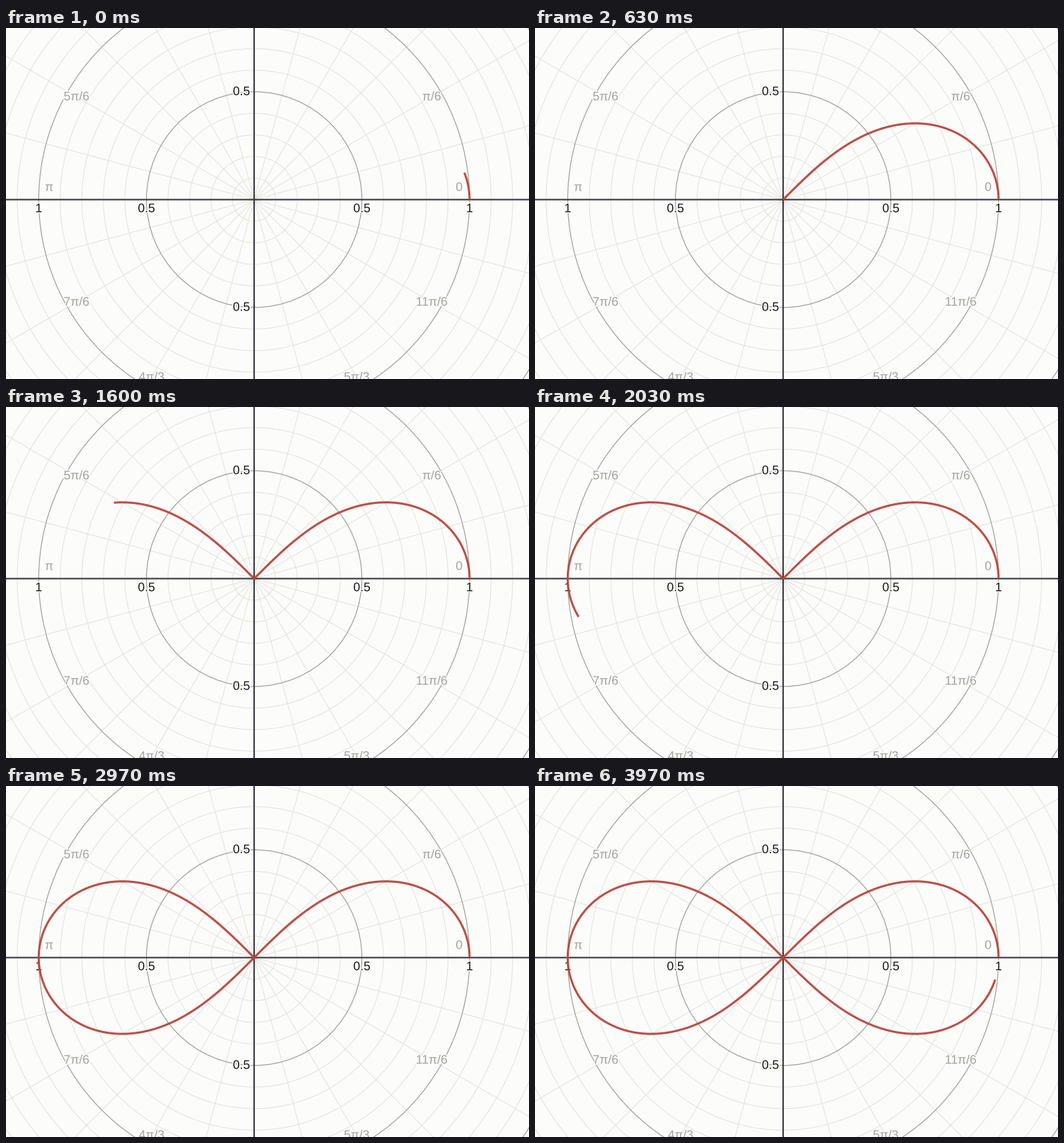
These frames come from a looping animation (740x496 px, 4010 ms). A matplotlib script:

```python
import numpy as np
import matplotlib.pyplot as plt
from matplotlib.animation import FuncAnimation
from matplotlib.patches import Circle
from matplotlib.patheffects import withStroke

W, H, DPI = 740, 496, 100
LOOP_MS, FRAMES = 4010, 120
CX, CY, UNIT = 351.1, 242.5, 304.8
PT = 72 / DPI  # points per pixel

PAPER = "#fcfcfb"
GRID = "#e2e2de"
MAJOR = "#a0a099"
AXIS = "#35313a"
ANGLE = "#a3a39c"
NUMBER = "#161616"
CURVE = "#b8463e"

plt.rcParams["font.family"] = "Liberation Sans"

fig = plt.figure(figsize=(W / DPI, H / DPI), dpi=DPI, facecolor=PAPER)
ax = fig.add_axes([0, 0, 1, 1])
ax.set_xlim(0, W)
ax.set_ylim(H, 0)
ax.axis("off")


def to_px(r, theta):
    return CX + UNIT * r * np.cos(theta), CY - UNIT * r * np.sin(theta)


def label(x, y, text, color):
    ax.text(x, y + 4.8, text, color=color, fontsize=17.5 * PT, ha="center",
            va="baseline", zorder=4,
            path_effects=[withStroke(linewidth=3 * PT, foreground=PAPER)])


def line(xs, ys, color, width, zorder):
    ax.plot(xs, ys, color=color, lw=width * PT, zorder=zorder, snap=False)


def draw_grid():
    for k in range(1, 16):
        major = k % 5 == 0
        ax.add_patch(Circle((CX, CY), UNIT * k / 10, fill=False,
                            ec=MAJOR if major else GRID,
                            lw=(1.2 if major else 1) * PT,
                            zorder=2 if major else 1))
    for deg in range(0, 360, 15):
        x, y = to_px(1.6, np.radians(deg))
        line([CX, x], [CY, y], GRID, 1, 1)
    line([0, W], [CY, CY], AXIS, 2, 5)
    line([CX, CX], [0, H], AXIS, 2, 5)


def draw_labels():
    angles = {30: "π/6", 150: "5π/6", 210: "7π/6",
              240: "4π/3", 300: "5π/3", 330: "11π/6"}
    for deg, text in angles.items():
        label(*to_px(0.952, np.radians(deg)), text, ANGLE)
    label(CX + 290, CY - 17, "0", ANGLE)
    label(CX - 290, CY - 17, "π", ANGLE)
    for r, text in ((0.5, "0.5"), (1, "1")):
        for side in (-1, 1):
            label(CX + side * r * UNIT, CY + 13, text, NUMBER)
    for side in (-1, 1):
        label(CX - 18, CY + side * 0.5 * UNIT, "0.5", NUMBER)


draw_grid()
draw_labels()
curve, = ax.plot([], [], color=CURVE, lw=3 * PT, alpha=0.95, zorder=6,
                 solid_capstyle="butt", solid_joinstyle="round")


def sweep(i):
    """Angle reached at step i; the pace eases slightly in the second half."""
    return np.interp(i, [0, 47, 60, 118], [0.127, 2.646, 3.326, 6.18])


def update(i):
    theta = np.linspace(0, sweep(i), 1500)
    r = np.sqrt(np.maximum(np.cos(2 * theta), 0))  # lemniscate
    curve.set_data(*to_px(r, theta))
    return curve,


anim = FuncAnimation(fig, update, frames=FRAMES, interval=LOOP_MS / FRAMES,
                     repeat=True, repeat_delay=0, blit=False)
plt.show()
```
